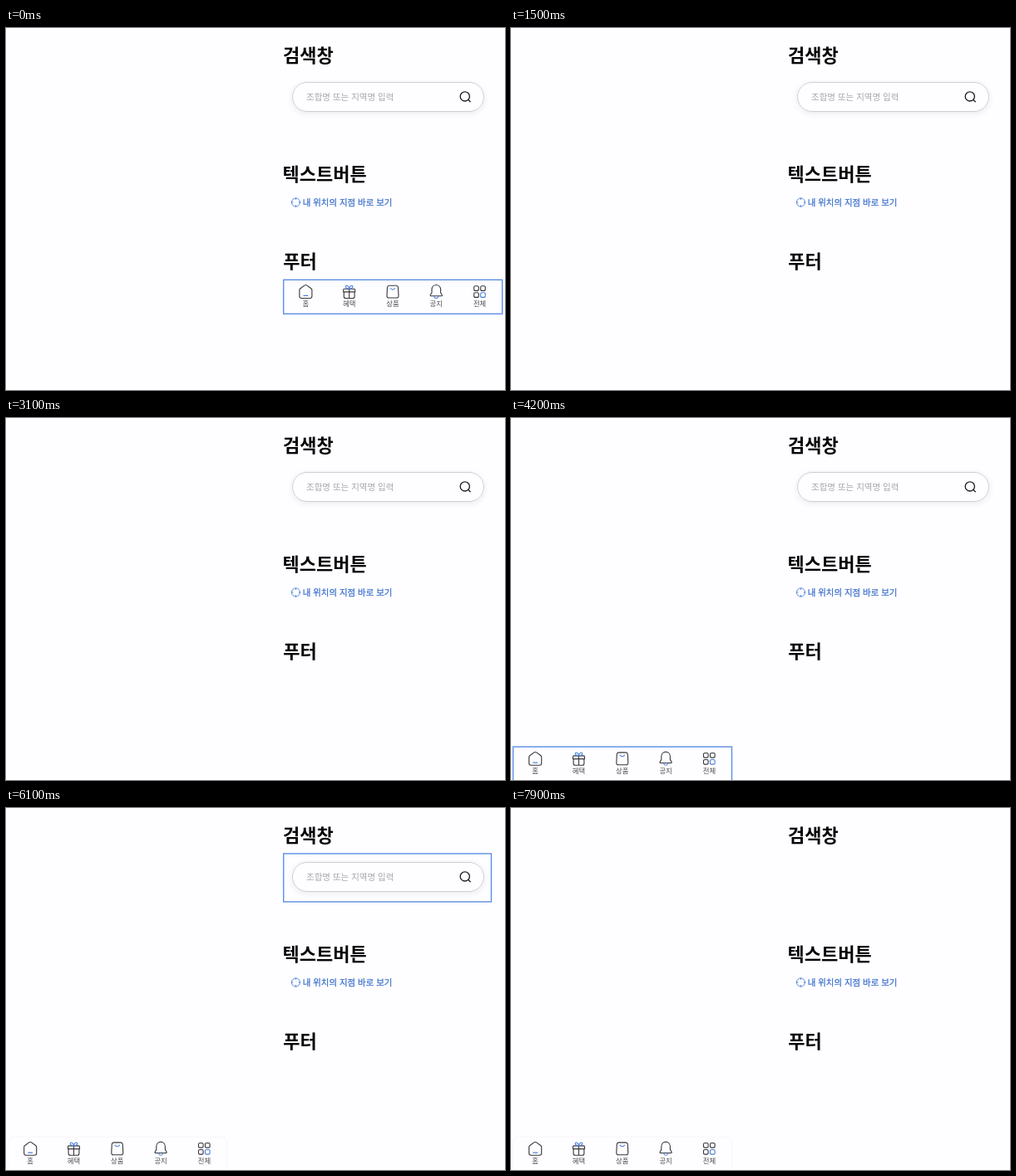
These frames come from a looping animation (600x436 px, 8 s). An HTML page:

```html
<!DOCTYPE html>
<html lang="ko">
<head>
<meta charset="utf-8">
<title>UI components</title>
<style>
  html, body { margin: 0; width: 100%; height: 100%; overflow: hidden; background: #fefdff; }
  svg { display: block; width: 600px; height: 436px; }
  text { font-family: "Noto Sans CJK KR", "Noto Sans CJK", "Noto Sans KR", sans-serif; }
  .heading { font-size: 22px; font-weight: 700; fill: #050506; }
  .hint { font-size: 10.5px; fill: #a6a5a9; }
  .link { font-size: 10.45px; fill: #3d72cb; stroke: #3d72cb; stroke-width: .25; }
  .label { font-size: 8.4px; fill: #4c4c50; text-anchor: middle; }
  .icon { fill: none; stroke: #37373d; stroke-width: 1.1; stroke-linecap: round; stroke-linejoin: round; }
  .accent { stroke: #4a80da; }
  .select { fill: none; stroke: #5c90e6; stroke-width: 1.4; }
</style>
</head>
<body>
<svg viewBox="0 0 600 436">
  <defs>
    <filter id="soft" x="-10%" y="-30%" width="120%" height="180%">
      <feDropShadow dx="0" dy="2" stdDeviation="3" flood-color="#50506a" flood-opacity=".11"/>
    </filter>
  </defs>
  <rect width="600" height="436" fill="#fefdff"/>

  <text class="heading" x="333" y="40.7">검색창</text>
  <text class="heading" x="332.5" y="183.7">텍스트버튼</text>
  <text class="heading" x="333.2" y="288.6">푸터</text>

  <g id="search">
    <rect x="344.5" y="65.5" width="230" height="35" rx="17.5" fill="#fefdff" stroke="#cfcfd3" filter="url(#soft)"/>
    <text class="hint" x="361" y="86.8">조합명 또는 지역명 입력</text>
    <g class="icon" style="stroke:#1c1c1f;stroke-width:1.35">
      <circle cx="551.8" cy="82.4" r="5.6"/>
      <path d="M555.9 86.5l2.3 2.2"/>
    </g>
  </g>
  <rect id="searchSelect" class="select" x="333.7" y="55" width="249.8" height="58"/>

  <g class="icon accent" style="stroke-width:.9">
    <circle cx="348.5" cy="210" r="5.1"/>
    <path d="M348.5 205v1.5M348.5 213.5v1.5M343.5 210h1.5M352 210h1.5"/>
  </g>
  <text class="link" x="356.7" y="213.5">내 위치의 지점 바로 보기</text>

  <g id="footer">
    <path d="M0 50V10Q0 .5 10 .5H254Q264 .5 264 10V50" fill="#fefdff" stroke="#f6f5f8"/>
    <g id="tabs"></g>
    <rect id="footerSelect" class="select" x=".5" y=".5" width="263" height="41"/>
  </g>
</svg>
<script>
const LOOP = 8000;
const FOOTER_CUT = 1200, FOOTER_PASTE = 3900, FOOTER_DESELECT = 4400;
const SEARCH_SELECT = 5900, SEARCH_CUT = 7600;

// Icons are drawn around their own centre.
const tabs = [
  ['홈', 'M-7.5 -1.8Q-7.5 -3 -6.5 -3.7L-1.2 -7.6Q0 -8.4 1.2 -7.6L6.5 -3.7Q7.5 -3 7.5 -1.8V5.5Q7.5 8 5 8H-5Q-7.5 8 -7.5 5.5Z',
    'M-2.5 4.9H2.5'],
  ['혜택', 'M-6 -3.3H6Q7 -3.3 7 -2.3V0.4H-7V-2.3Q-7 -3.3 -6 -3.3ZM-6.4 .4V6Q-6.4 8 -4.4 8H4.4Q6.4 8 6.4 6V.4M0 -3.3V8',
    'M0 -3.5C-2 -3.5 -4.6 -4.2 -4.2 -6.1C-3.6 -8.2 -.4 -7.4 0 -3.5C.4 -7.4 3.6 -8.2 4.2 -6.1C4.6 -4.2 2 -3.5 0 -3.5Z'],
  ['상품', 'M-4.3 -7.3H4.3Q6.3 -7.3 6.5 -5.2L7 4.9Q7.1 7.5 4.7 7.5H-4.7Q-7.1 7.5 -7 4.9L-6.5 -5.2Q-6.3 -7.3 -4.3 -7.3Z',
    'M-2.8 -4Q0 -.8 2.8 -4'],
  ['공지', 'M-5.3 -2.3C-5.3 -10 5.3 -10 5.3 -2.3V1.2L7 4Q7.5 5.3 6 5.3H-6Q-7.5 5.3 -7 4L-5.3 1.2Z',
    'M-2.5 5.8Q-2.1 8 0 8T2.5 5.8'],
  ['전체', square(-6.9, -6.7) + square(1.1, -6.7) + square(-6.9, 1.3), square(1.1, 1.3)]
];

function square(x, y) {
  return `M${x + 1.6} ${y}h2.4q1.6 0 1.6 1.6v2.4q0 1.6 -1.6 1.6h-2.4q-1.6 0 -1.6 -1.6v-2.4q0 -1.6 1.6 -1.6z`;
}

const $ = id => document.getElementById(id);
const show = (id, on) => $(id).setAttribute('visibility', on ? 'visible' : 'hidden');

$('tabs').innerHTML = tabs.map(([label, shape, accent], i) => `
  <g transform="translate(${27.2 + i * 52.3} 14.7)">
    <path class="icon" d="${shape}"/>
    <path class="icon accent" d="${accent}"/>
    <text class="label" y="17.9">${label}</text>
  </g>`).join('');

function render(t) {
  const pasted = t >= FOOTER_PASTE;
  const footerOn = t < FOOTER_CUT || pasted;
  const searchOn = t < SEARCH_CUT;
  $('footer').setAttribute('transform', pasted ? 'translate(2 395.5)' : 'translate(333.2 302.8)');
  $('footer').setAttribute('display', footerOn ? 'inline' : 'none');
  show('footerSelect', footerOn && t < FOOTER_DESELECT);
  show('search', searchOn);
  show('searchSelect', searchOn && t >= SEARCH_SELECT);
}

const start = performance.now();
function tick() {
  render((performance.now() - start) % LOOP);
  requestAnimationFrame(tick);
}
render(0);
requestAnimationFrame(tick);
</script>
</body>
</html>
```
